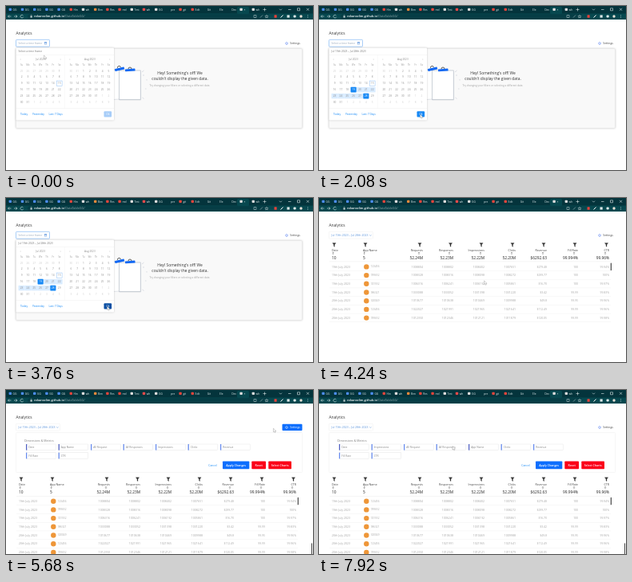
These frames come from a looping animation (384x206 px, 8 s). An HTML page:

```html
<!DOCTYPE html>
<html lang="en">
<head>
<meta charset="utf-8">
<title>Analytics</title>
<style>
html, body { margin: 0; height: 100%; overflow: hidden; background: #fff }
svg { display: block; width: 100vw; height: 100vh; font-family: "Open Sans", "Noto Sans", sans-serif }
text { white-space: pre }
</style>
</head>
<body>
<svg id="stage" viewBox="0 0 384 206"></svg>
<script>
const LOOP = 8000;
const BLUE = '#1588f5', GREY = '#a3a3a3', DARK = '#333';

const rect = (x, y, w, h, fill, more = '') =>
  `<rect x="${x}" y="${y}" width="${w}" height="${h}" fill="${fill}" ${more}/>`;
const text = (x, y, s, size, fill = DARK, anchor = 'start', more = '') =>
  `<text x="${x}" y="${y}" font-size="${size}" fill="${fill}" text-anchor="${anchor}" ${more}>${s}</text>`;
const path = (d, stroke, fill = 'none', w = .6, more = '') =>
  `<path d="${d}" stroke="${stroke}" fill="${fill}" stroke-width="${w}" ${more}/>`;
const dot = (x, y, r, fill) => `<circle cx="${x}" cy="${y}" r="${r}" fill="${fill}"/>`;
const shadow = 'filter="drop-shadow(0 .4px .8px #0003)"';

function browser() {
  const labels = 'GG,GG,GG,GG,GG,Hin,wh,Ben,Res,red,Test,wh,GG,pre,git,Edit,Git,Ele,Dev,×,wh'.split(',');
  const icons = ['#4d8df0', '#4d8df0', '#4d8df0', '#4d8df0', '#4d8df0', '#e8453c', '#ddd', '#e88a3c',
    '#e8453c', '#e8453c', '#ddd', '#f04a4a', '#ddd', 'none', '#e8453c', '#e8453c', 'none',
    'none', 'none', '#ddd', '#ddd'];
  let s = rect(0, 0, 384, 10, '#04343c') + rect(0, 9.5, 384, 7.5, '#07484f');
  s += rect(289, 1, 15, 9, '#07484f', 'rx="1.5"');
  labels.forEach((name, i) => {
    const x = 3.6 + i * 15.2;
    s += rect(x, 2.7, 3.4, 3.4, icons[i], 'rx=".8"') + text(x + 5, 5.7, name, 3.3, '#e5eeee');
  });
  s += path('M321.5 4.5h4m-2-2v4M342 3.7l1.5 1.5 1.5-1.5M353 4.5h3.5M364.5 2.8h3v3h-3zM376 2.8l3 3m0-3l-3 3', '#dce8e8');
  s += rect(27, 10.2, 302, 6, '#063d45', 'rx="3"');
  s += path('M6.5 13h-4l1.6-1.6M2.5 13l1.6 1.6M10 13h4l-1.6-1.6M14 13l-1.6 1.6M21.5 12a1.9 1.9 0 1 0 .2 1.8', '#dce8e8');
  s += rect(30.5, 12.5, 2.2, 2, '#cfdcdc') + path('M31 12.5v-.7a.6.6 0 0 1 1.2 0v.7', '#cfdcdc', 'none', .4);
  s += `<text x="35" y="14.2" font-size="3.8" fill="#8fa8ab"><tspan fill="#fff" font-weight="600">rokanselim.github.io</tspan>/DataTableGG/</text>`;
  s += path('M310 11.5h3v3h-3zM318 14.5l3-3M326 11.2l.6 1.3 1.4.1-1 1 .3 1.4-1.3-.7-1.3.7.3-1.4-1-1 1.4-.1z', '#cfdcdc', 'none', .5);
  s += rect(335.5, 11.2, 3.2, 3.6, '#e3403a', 'rx=".5"') + path('M343.5 14.5l3-3', '#fff', 'none', 1);
  s += rect(351.5, 11.4, 3.2, 3.2, '#dce8e8') + rect(359.5, 11.4, 3.2, 3.2, '#dce8e8', 'rx="1"');
  return s + dot(369, 13, 1.7, '#e6e0d6') + dot(377.5, 11.7, .4, '#fff') + dot(377.5, 13, .4, '#fff') + dot(377.5, 14.3, .4, '#fff');
}

function emptyCard() {
  let s = rect(12.5, 53.5, 358, 100, '#f9f9f9', `rx="1.5" stroke="#e2e2e2" stroke-width=".5" ${shadow}`);
  s += rect(126, 80, 30, 37, '#fff', 'stroke="#c5ccd5" stroke-width=".5" transform="rotate(-4 141 99)"');
  s += rect(141.5, 81, 26.7, 36.5, '#fff', 'stroke="#a9b2be" stroke-width=".6"');
  s += path('M141.5 118h27.1V83', '#c9ced6', 'none', .6);
  s += rect(136, 77.8, 12, 3, '#1268f3', 'rx=".6" transform="rotate(-13 142 79)"');
  s += rect(149, 79, 12.5, 3, '#1268f3', 'rx=".6" transform="rotate(-4 155 80)"');
  s += path('M139.5 77.8a2 2 0 0 1 4-.8M153 79a2 2 0 0 1 4 0', '#333', 'none', .8);
  s += path('M170 83l2.5-2M171 87h2M170.5 115l2 1.5M176 92v1.5M174 104h1.5', '#b9c1cc', 'none', .5);
  s += text(217.5, 86, 'Hey! Something\'s off! We', 4.9, DARK, 'middle');
  s += text(217.5, 93.2, 'couldn\'t display the given data.', 4.9, DARK, 'middle');
  return s + text(217.5, 101.2, 'Try changing your filters or selecting a different date.', 3.1, GREY, 'middle');
}

const dayX = (month, i) => (month ? 81.3 : 19.6) + i % 7 * 7.85;
const dayY = i => 81.3 + Math.floor(i / 7) * 7.95;

// Grid cells of the first month: the 19th is cell 24, the 28th is cell 33.
function calendar(start, end, ready, pressed) {
  let s = rect(12.5, 52.5, 122.5, 91, '#fff', `rx="1" ${shadow}`);
  s += text(15.5, 57.6, ready ? 'Jul 19th 2023 – Jul 28th 2023' : 'Select a time frame', 3.3, '#777');
  s += rect(12.5, 61.3, 122.5, .3, '#e8e8e8') + rect(73.7, 61.5, .3, 67, '#eee') + rect(12.5, 128.5, 122.5, .3, '#e4e4e4');
  if (start) for (let i = 24; i <= end; i++) s += rect(dayX(0, i) - 4, dayY(i) - 3.2, 7.9, 6.4, '#d8ebff');
  const marked = i => start && i === 24 || ready && i === 33;
  ['Jul 2023', 'Aug 2023'].forEach((name, m) => {
    const lead = m ? 2 : 6, before = m ? 31 : 30;
    s += text(dayX(m, 3), 68.2, name, 3.2, '#8c8c8c', 'middle');
    [dayX(m, 0) - 1.5, dayX(m, 6) + 1.5].forEach((x, k) => s += text(x, 68.2, k ? '›' : '‹', 4, GREY, 'middle'));
    ['Su', 'Mo', 'Tu', 'We', 'Th', 'Fr', 'Sa'].forEach((d, i) => s += text(dayX(m, i), 75, d, 2.8, '#999', 'middle'));
    for (let i = 0; i < 42; i++) {
      const n = i - lead + 1, inside = n > 0 && n <= 31, on = !m && marked(i);
      const x = dayX(m, i), y = dayY(i);
      if (on) s += rect(x - 3.5, y - 3.3, 7, 6.6, BLUE, 'rx=".6"');
      if (!m && n === 15) s += rect(x - 3.4, y - 3.2, 6.8, 6.4, 'none', 'stroke="#8fc0f5" stroke-width=".5"');
      s += text(x, y + 1.2, n < 1 ? n + before : inside ? n : n - 31, 3.2, on ? '#fff' : inside ? '#8c8c8c' : '#ccc', 'middle');
    }
  });
  [[18, 'Today'], [33, 'Yesterday'], [53.5, 'Last 7 Days']].forEach(([x, name]) => s += text(x, 137.3, name, 3.3, BLUE));
  s += rect(122.5, 132.3, 9.6, 7.2, pressed ? '#0a4fa3' : ready ? BLUE : '#a7cdf8', 'rx="1"');
  return s + text(127.3, 137.2, 'Ok', 3.3, '#fff', 'middle');
}

function table() {
  const cols = [[16, 'Date', 10, 19], [55, 'App Name', 5, 58], [130, 'Requests', '52.24M', 126],
    [168, 'Responses', '52.23M', 164.5], [207, 'Impressions', '52.22M', 203], [246, 'Clicks', '52.20M', 242],
    [285, 'Revenue', '$6292.63', 281], [324, 'Fill Rate', '99.994%', 320], [363, 'CTR', '99.96%', 359.5]];
  const rows = `123456 1008804 1008802 1008402 1007651 $279.48 100 99.94%
789652 1008328 1008316 1008098 1008272 $299.77 100 100%
741552 1006316 1006241 1006192 1005861 $16.70 100 99.97%
986321 1033088 1033052 1031398 1031220 $3.42 99.99 99.83%
320049 1010677 1010638 1010469 1009988 $49.8 99.95 99.96%
123456 1022027 1021991 1021965 1021641 $112.49 99.99 99.96%
789652 1012350 1012346 1012121 1011879 $120.05 99.99 99.98%`.split('\n');
  let s = '';
  cols.forEach(([x, name, total, fx], i) => {
    const side = i < 2 ? 'start' : 'end', ax = i < 2 ? x + 1.7 : x - 5;
    s += path(`M${fx - 2.1} 56.5h4.2l-1.6 2.2v2.6l-1-.7v-1.9z`, '#333', '#333', .3);
    s += text(x, 66.6, name, 3.6, '#444', side);
    s += path(`M${ax} 71.2v-3m-.8.9l.8-.9 .8.9`, '#555', 'none', .5);
    s += text(x, 76.8, total, 4.8, '#222', side);
  });
  s += rect(13, 79.8, 352, .3, '#ddd');
  rows.forEach((row, r) => {
    const y = 87.6 + r * 10.7, [app, ...nums] = row.split(' ');
    s += text(16, y, (r < 4 ? 19 : 20) + 'th July 2023', 3.5, GREY);
    s += dot(59.3, y - 1.2, 3.2, '#ee9638') + text(64.8, y - .2, app, 3.1, GREY);
    nums.forEach((n, i) => s += text(cols[i + 2][0], y, n, i < 4 ? 3.6 : 3.4, GREY, 'end'));
    s += rect(13, y + 3.8, 352, .3, '#e6e6e6');
  });
  return s + rect(364.7, 81.5, 1.3, 9.5, '#555', 'rx=".6"');
}

function chip(x, y, name, more = '') {
  return `<g ${more}>${rect(x, y, 37, 7.6, '#fff', 'stroke="#e6e6e6" stroke-width=".5"')}${
    rect(x, y, 1, 7.6, /Date|App/.test(name) ? '#2b3fb8' : '#4472ee')}${text(x + 3, y + 5, name, 3.3, '#888')}</g>`;
}

function panel(t) {
  const names = ['Date', 'App Name', 'All Request', 'All Responses', 'Impressions', 'Clicks', 'Revenue', 'Fill Rate', 'CTR'];
  if (t >= 7200) [names[1], names[4]] = [names[4], names[1]];
  let s = rect(12.5, 53.5, 358, 50, '#fff', 'rx="1" stroke="#ececec" stroke-width=".5"');
  s += text(23, 65, 'Dimensions &amp; Metrics', 3.6, '#777');
  names.forEach((n, i) => s += chip(25.2 + i % 7 * 40.5, i < 7 ? 68 : 78.7, n));
  s += text(258.5, 96, 'Cancel', 3.4, BLUE, 'middle');
  [[271, 33.3, '#0d6efd', 'Apply Changes'], [307.3, 17.7, '#fb0018', 'Reset'], [328.3, 28.7, '#fb0018', 'Select Charts']].forEach(
    ([x, w, c, name]) => s += rect(x, 89.5, w, 9.8, c, 'rx=".8"') + text(x + w / 2, 95.7, name, 3.5, '#fff', 'middle', 'font-weight="600"'));
  return s + rect(382, 192.5, 1, 13.5, '#444');
}

function toolbar(t, picked) {
  const hover = t >= 4640 && t < 5760;
  let s = text(12.5, 36.2, 'Analytics', 4.9);
  s += rect(12.5, 42.3, picked ? 55 : 42, 8.8, '#fff', `rx="1" stroke="${picked ? '#f0f0f0' : '#6fadf2'}" stroke-width=".6"`);
  if (picked) s += text(15.5, 48.3, 'Jul 19th 2023 – Jul 28th 2023', 3.5, '#5b93db') + path('M63.4 46.4l1 1 1-1', '#5b93db');
  else s += text(15.5, 48.1, 'Select a time frame', 3.3, '#9aaabd') +
    rect(48.2, 45.4, 2.6, 2.6, '#fff', 'stroke="#5b93db" stroke-width=".5"') + rect(48.2, 45.4, 2.6, .9, '#5b93db');
  if (hover) s += rect(345.5, 42.7, 25, 8.4, '#0d6efd', 'rx="1"');
  return s + `<circle cx="351" cy="46.9" r="1.3" fill="none" stroke="${hover ? '#fff' : '#4472ee'}" stroke-width=".9" stroke-dasharray=".7 .32"/>` +
    text(355.3, 48.2, 'Settings', 3.4, hover ? '#fff' : '#444');
}

const track = [[0, 47.5, 62], [480, 43, 103], [640, 43, 103], [960, 57, 112.5], [1280, 58, 113], [1840, 126.5, 136],
  [3920, 126.5, 136], [4720, 354, 45], [5520, 354, 45], [6240, 199, 70.5], [6560, 199, 70.5],
  [7120, 76, 71], [7280, 76, 71], [7760, 167, 70.5], [LOOP, 167, 70.5]];

function pointer(t) {
  const i = track.findIndex(k => k[0] > t), [t0, x0, y0] = track[i - 1], [t1, x1, y1] = track[i];
  const p = (t - t0) / (t1 - t0), e = p * p * (3 - 2 * p);
  return [x0 + (x1 - x0) * e, y0 + (y1 - y0) * e];
}

const chromeBar = browser(), card = emptyCard(), grid = table();

function scene(t) {
  const [x, y] = pointer(t);
  const picked = t >= 4000, open = t >= 5520, ready = t >= 1200;
  let s = toolbar(t, picked);
  if (picked) s += `<g transform="translate(0 ${open ? 53.3 : 0})">${grid}</g>`;
  else {
    const row = Math.max(3, Math.min(4, Math.round((y - 81.3) / 7.95)));
    const col = Math.max(0, Math.min(6, Math.round((x - 19.6) / 7.85)));
    s += card + calendar(t >= 560, ready ? 33 : row * 7 + col, ready, t >= 3680);
  }
  if (open) s += panel(t);
  if (t >= 6560 && t < 7200) s += chip(x - 11.6, y - 2.5, 'Impressions', 'opacity=".65"');
  const arrow = path('M0 0v4.6l1.1-.9 .8 1.6 .8-.4-.7-1.5h1.5z', '#777', '#fff', .35, `transform="translate(${x} ${y})"`);
  return s + arrow + chromeBar;
}

const stage = document.getElementById('stage');
let last = -1;
function draw(now) {
  const t = Math.floor(now % LOOP / 80) * 80;
  if (t !== last) stage.innerHTML = scene(last = t);
  requestAnimationFrame(draw);
}
draw(performance.now());
</script>
</body>
</html>
```
